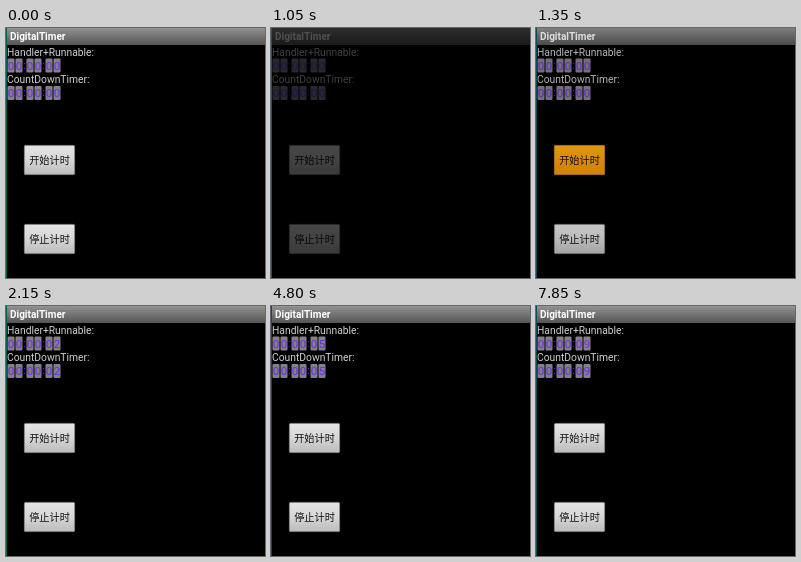
An HTML page for the animation above (8 s loop, 259 by 250 pixels).

```html
<!DOCTYPE html>
<html lang="zh">
<head>
<meta charset="utf-8">
<title>DigitalTimer</title>
<style>
html, body { margin: 0; width: 100%; height: 100%; overflow: hidden; background: #000; }
svg { display: block; }
text { font-family: Roboto, "Noto Sans", sans-serif; }
.label { font-size: 10.3px; fill: #cfcfcf; }
.btn { font: 10.2px "Noto Sans CJK SC", "Noto Sans CJK", sans-serif; fill: #111; text-anchor: middle; }
.digit { font-size: 11.5px; fill: #6a2be6; text-anchor: middle; }
.colon { font-size: 10px; fill: #6a2be6; text-anchor: middle; }

.dim, .press, .edge, .strip { animation: 8s step-end infinite; }
.dim { animation-name: dim; }
.press { animation-name: press; }
.edge { animation-name: edge; }
.strip1 { animation-name: count1; }
.strip2 { animation-name: count2; }

@keyframes dim {
  0% { opacity: 0; }
  5.625% { opacity: .12; }
  6.25% { opacity: .25; }
  6.875% { opacity: .38; }
  7.5% { opacity: .51; }
  8.125% { opacity: .62; }
  8.75% { opacity: .72; }
  13.125% { opacity: .69; }
  14.375% { opacity: .58; }
  15% { opacity: .47; }
  15.625% { opacity: .36; }
  16.25% { opacity: .25; }
  16.875% { opacity: .13; }
  17.5%, 100% { opacity: 0; }
}
@keyframes press {
  0%, 18.125%, 100% { opacity: 0; }
  16.25% { opacity: 1; }
}
@keyframes edge {
  0%, 18.75%, 26.25%, 33.75%, 41.25%, 48.75%, 56.25%, 63.75%, 71.25%, 78.75%, 86.25%, 93.75%, 100% { fill: #0b5c62; }
  15%, 22.5%, 30%, 37.5%, 45%, 52.5%, 60%, 67.5%, 75%, 82.5%, 90%, 97.5% { fill: #0c4a63; }
}
@keyframes count1 {
  0% { transform: translateY(0); }
  18.125% { transform: translateY(-14px); }
  26.25% { transform: translateY(-28px); }
  37.5% { transform: translateY(-42px); }
  47.5% { transform: translateY(-56px); }
  56.25% { transform: translateY(-70px); }
  67.5% { transform: translateY(-84px); }
  77.5% { transform: translateY(-98px); }
  86.25% { transform: translateY(-112px); }
  97.5%, 100% { transform: translateY(-126px); }
}
@keyframes count2 {
  0% { transform: translateY(0); }
  18.75% { transform: translateY(-14px); }
  26.875% { transform: translateY(-28px); }
  37.5% { transform: translateY(-42px); }
  48.75% { transform: translateY(-56px); }
  57.5% { transform: translateY(-70px); }
  67.5% { transform: translateY(-84px); }
  78.75% { transform: translateY(-98px); }
  87.5% { transform: translateY(-112px); }
  98.125%, 100% { transform: translateY(-126px); }
}
</style>
</head>
<body>
<svg width="259" height="250" viewBox="0 0 259 250">
  <defs>
    <linearGradient id="bar" x2="0" y2="1">
      <stop stop-color="#929292"/><stop offset="1" stop-color="#555"/>
    </linearGradient>
    <linearGradient id="face" x2="0" y2="1">
      <stop stop-color="#e4e4e4"/><stop offset=".5" stop-color="#d6d6d6"/><stop offset="1" stop-color="#bcbcbc"/>
    </linearGradient>
    <linearGradient id="hot" x2="0" y2="1">
      <stop stop-color="#ffae14"/><stop offset="1" stop-color="#f39200"/>
    </linearGradient>
    <g id="cells">
      <g fill="#858088">
        <rect x="1.5" width="7" height="14" rx="1"/><rect x="9.5" width="7" height="14" rx="1"/>
        <rect x="20.5" width="7" height="14" rx="1"/><rect x="28.5" width="7" height="14" rx="1"/>
        <rect x="39.5" width="7" height="14" rx="1"/><rect x="47.5" width="7" height="14" rx="1"/>
      </g>
      <text class="digit" y="11"><tspan x="5">0</tspan><tspan x="13">0</tspan><tspan x="24">0</tspan><tspan x="32">0</tspan><tspan x="43">0</tspan></text>
      <text class="colon" y="10"><tspan x="18.5">:</tspan><tspan x="37.5">:</tspan></text>
    </g>
  </defs>

  <rect width="259" height="250"/>
  <rect width="259" height="17" fill="url(#bar)"/>
  <text x="4" y="12" font-size="10" font-weight="700" fill="#fff">DigitalTimer</text>

  <text class="label" x="1" y="27.5">Handler+Runnable:</text>
  <use href="#cells" y="30.5"/>
  <svg x="47.5" y="30.5" width="7" height="14"><g class="strip strip1"></g></svg>

  <text class="label" x="1" y="55">CountDownTimer:</text>
  <use href="#cells" y="58"/>
  <svg x="47.5" y="58" width="7" height="14"><g class="strip strip2"></g></svg>

  <g stroke="#8d8d8d" stroke-width=".8">
    <rect x="18.4" y="117.4" width="50.2" height="29.2" rx="1.2" fill="url(#face)"/>
    <rect x="18.4" y="196.4" width="50.2" height="29.2" rx="1.2" fill="url(#face)"/>
  </g>
  <rect class="press" x="18.4" y="117.4" width="50.2" height="29.2" rx="1.2" fill="url(#hot)" stroke="#b87410" stroke-width=".8"/>
  <text class="btn" x="43.5" y="136">开始计时</text>
  <text class="btn" x="43.5" y="215">停止计时</text>

  <rect class="dim" x="1" width="258" height="250"/>
  <rect class="edge" width="1" height="250" fill="#0b5c62"/>
</svg>
<script>
// Fill each seconds strip with the digits 0 to 9, one per 14px row.
for (const strip of document.querySelectorAll(".strip")) {
  for (let n = 0; n < 10; n++) {
    const t = document.createElementNS("http://www.w3.org/2000/svg", "text");
    t.setAttribute("class", "digit");
    t.setAttribute("x", 3.5);
    t.setAttribute("y", 11 + n * 14);
    t.textContent = n;
    strip.append(t);
  }
}
</script>
</body>
</html>
```
